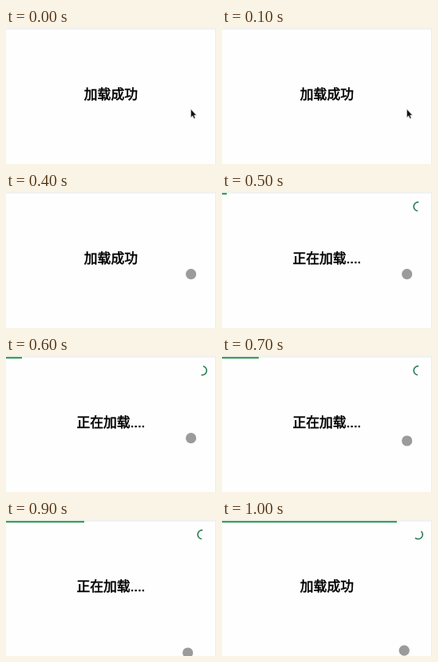
An HTML page for the animation above (1.1 s loop, 263x170 px).

```html
<!DOCTYPE html>
<html lang="zh">
<head>
<meta charset="utf-8">
<title>加载</title>
<style>
  html, body { margin: 0; width: 100%; height: 100%; overflow: hidden; background: #fefefe; }
  svg { display: block; width: 263px; height: 170px; }
  text {
    font: 16.8px "Liberation Sans", "Noto Sans CJK SC", "Noto Sans CJK", sans-serif;
    text-anchor: middle; stroke: #000; stroke-width: .6;
  }
</style>
</head>
<body>
<svg viewBox="0 0 263 170">
  <rect width="263" height="170" fill="#fefefe"/>
  <rect width="263" height="2" fill="#f1f1f1"/>
  <rect x="262" width="1" height="170" fill="#ececec"/>
  <rect id="bar" y="1.3" height="1.9" fill="#1a9140"/>
  <path id="spinner" d="M0-5.6A5.6 5.6 0 0 1 0 5.6" fill="none" stroke="#2c7d57" stroke-width="1.6"/>
  <text id="label" x="131.4" y="88.6"></text>
  <path id="arrow" d="M231.5 101.5V111.8L233.8 109.7L235.4 113.2L237 112.5L235.5 109.1H238.4Z" fill="#111" stroke="#ddd" stroke-width=".5"/>
  <circle id="press" r="6.6" fill="#9b9b9b"/>
</svg>
<script>
const STEP = 100, LOOP = 1100, LOAD_START = 500, LOAD_END = 1000, PRESS_START = 400;
const part = id => document.getElementById(id);
const [bar, spinner, label, arrow, press] = ["bar", "spinner", "label", "arrow", "press"].map(part);

// One entry per step from LOAD_START: bar width, spinner angle.
const progress = [[6, 185], [20, 12], [46, 185], [72, 12], [98, 185], [219, 42]];
// One entry per step from PRESS_START: pointer position.
const pointer = [[231.7, 102.7], [231.7, 102.7], [231.7, 102.7], [231.7, 106], [231.7, 118.7], [227.7, 166], [228.2, 163.2]];

const show = (el, on) => el.setAttribute("visibility", on ? "visible" : "hidden");

function draw(time) {
  const t = Math.floor(time % LOOP / STEP) * STEP;
  const loading = t >= LOAD_START, pressed = t >= PRESS_START;

  label.textContent = loading && t < LOAD_END ? "正在加载...." : "加载成功";
  show(bar, loading);
  show(spinner, loading);
  show(arrow, !pressed);
  show(press, pressed);

  if (loading) {
    const [width, angle] = progress[(t - LOAD_START) / STEP];
    bar.setAttribute("width", width);
    spinner.setAttribute("transform", `translate(245.7 18.2) rotate(${angle})`);
  }
  if (pressed) {
    const [x, y] = pointer[(t - PRESS_START) / STEP];
    press.setAttribute("cx", x);
    press.setAttribute("cy", y);
  }
}

const start = performance.now();
function tick() {
  draw(performance.now() - start);
  requestAnimationFrame(tick);
}
tick();
</script>
</body>
</html>
```
